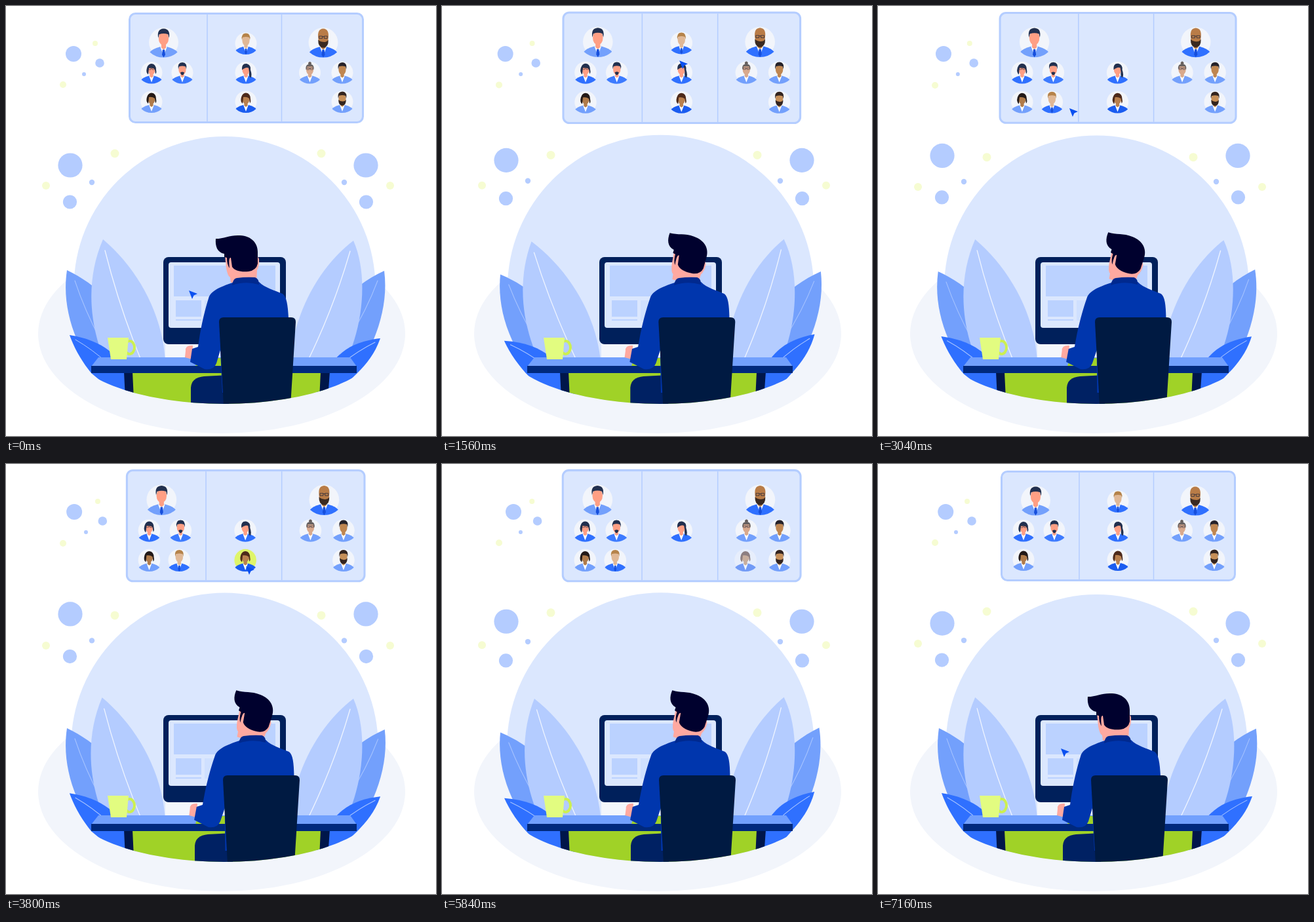
Animation of 656x656 px, one loop 7.2 s. Source, as an HTML page:

```html
<!DOCTYPE html>
<html lang="en">
<head>
<meta charset="utf-8">
<title>Team call</title>
<style>
html, body { margin: 0; width: 100%; height: 100%; overflow: hidden; background: #fff; }
svg { display: block; width: 100vw; height: 100vh; }
.vein { fill: none; stroke: #f0f5ff; stroke-width: 1.3; stroke-linecap: round; }
.thin { stroke: #a9c5ff; stroke-width: 1; }
</style>
</head>
<body>
<svg viewBox="0 0 656 656">
  <clipPath id="bowl"><path d="M0 0H656V513H573A240 94 0 0 1 93 513H0z"/></clipPath>
  <ellipse cx="329" cy="500" rx="280" ry="152" fill="#f2f5fb"/>
  <g clip-path="url(#bowl)">
    <circle id="dome" cx="333.5" cy="429" r="230" fill="#dbe7fe"/>
  </g>
  <g id="bubbles"></g>
  <g id="panel">
    <rect x="188.5" y="11.5" width="356" height="166" rx="9" fill="#dbe7fe" stroke="#b4cdff" stroke-width="3"/>
    <path d="M307 13V176M420.5 13V176" stroke="#b4cdff" stroke-width="1.5"/>
  </g>
  <g clip-path="url(#bowl)">
    <g id="leaves">
      <g><path fill="#73a0fc" d="M93 403C86 450 98 500 130 550H220C190 480 150 430 93 403"/>
        <path class="vein thin" d="M105 419Q122 470 150 520"/></g>
      <g><path fill="#73a0fc" d="M577 404C583 450 570 500 540 550H450C480 480 520 430 577 404"/>
        <path class="vein thin" d="M567 419Q548 470 515 520"/></g>
      <g><path fill="#b4ccff" d="M148 356C120 420 128 490 152 545H243C240 470 200 400 148 356"/>
        <path class="vein" d="M151 373Q173 460 206 540"/></g>
      <g><path fill="#b4ccff" d="M530 358C553 410 545 490 517 545H432C440 470 475 400 530 358"/>
        <path class="vein" d="M525 374Q500 460 461 540"/></g>
      <g><path fill="#2f70ff" d="M97 502C104 522 116 543 130 560L178 600H200C185 545 160 512 97 502"/>
        <path class="vein thin" d="M106 509Q132 524 155 545"/></g>
      <g><path fill="#2f70ff" d="M571 507C563 530 550 546 536 560L495 600H470C490 545 510 514 571 507"/>
        <path class="vein thin" d="M563 513Q537 526 513 545"/></g>
    </g>
    <path fill="#f3f6fc" d="M243 514H420V537H243z"/>
    <rect x="240" y="383" width="187" height="133" rx="8" fill="#00205b"/>
    <rect x="248" y="391" width="170" height="100" rx="4" fill="#dbe7fe"/>
    <path fill="#bbd2ff" d="M256 396H411V443H256zM259 449H298V474H259zM259 478H298V480H259z"/>
    <path fill="#cfe0ff" d="M303 449H411V480H303z"/>
    <path fill="#a0d227" d="M190 558H485V610H190z"/>
    <path fill="#00164a" d="M180 558H193L195 600H182zM480 558H494L491 600H478z"/>
    <path fill="#72a0fd" d="M141 536H525L535 550H130z"/>
    <path fill="#00297d" d="M130 549H535V560H130z"/>
    <path fill="#a0d227" d="M293 537H336V549H289z"/>
    <ellipse cx="188.5" cy="521" rx="7.5" ry="10" fill="none" stroke="#ccef52" stroke-width="4"/>
    <path fill="#e2fc80" d="M155 506H187L184 539H160z"/>
    <path id="cursor" fill="#0b50f0" d="M0 0L13 5L7.5 7.5L5 13z"/>
    <path id="legs" fill="#002163" d="M282 610V582Q283 567 302 565L340 563V610z"/>
    <g id="head">
      <path fill="#ffa9a0" d="M334 380L336 400Q338 412 342 414L343 422H382L383 403Q387 396 386 386L380 375z"/>
      <path fill="#00012e" d="M320 355C333 355 342 349 357 350C375 351 384 362 384 375V393Q382 403 370 405C358 406 349 404 345 398L343 384Q339 383 341 400Q337 394 337 384L333 383V378C322 376 319 366 320 355"/>
    </g>
    <g id="torso">
      <path fill="#ffa9a0" d="M285 518Q273 517 274 526L273 536L284 539z"/>
      <path fill="#0036ad" d="M346 422C325 429 312 435 309 446C303 465 297 490 293 520L284 523L281 543L303 554Q317 556 321 545L327 525L330 590H428L431 476C430 456 428 443 422 439C410 434 395 430 386 421z"/>
      <path fill="#00298f" d="M345 426Q346 416 352 415Q366 413 380 414Q386 416 386 425Q365 419 345 426"/>
    </g>
    <path id="chair" fill="#001a42" d="M332 475H435Q442 475 442 482L434 610H332L325 482Q325 475 332 475"/>
  </g>
</svg>
<script>
const LOOP = 7200;
const $ = id => document.getElementById(id);
const put = (el, v) => el.setAttribute('transform', v);

function add(parent, tag, attrs) {
  const el = document.createElementNS('http://www.w3.org/2000/svg', tag);
  for (const k in attrs) el.setAttribute(k, attrs[k]);
  return parent.appendChild(el);
}

// eased 0..1 between two times
function ramp(t, a, b) {
  const u = Math.min(1, Math.max(0, (t - a) / (b - a)));
  return (1 - Math.cos(Math.PI * u)) / 2;
}

// smooth wave, zero at t = 0; a lag shifts its crest
const hump = (t, period) => Math.sin(Math.PI * t / period) ** 2;
const wave = (t, period, lag) => hump(t - lag, period) - hump(-lag, period);

// pivot x, y, swing in degrees, lag
const sway = [
  [230, 490, -3, 100], [500, 470, 3.8, -900],
  [200, 560, -3.5, -300], [470, 560, -2.6, 100],
  [190, 530, -5.5, 0], [480, 540, -4.8, 200]
];
const leaves = [...$('leaves').children];

const BLUE = '#b4ccff', LIME = '#f6fcd2';
const bubbles = [];
function bubble(x, y, r, fill, dx, dy, lag) {
  bubbles.push({ el: add($('bubbles'), 'circle', { r, fill }), x, y, dx, dy, lag });
}
bubble(103, 73, 12, BLUE, -13, 0, -1800);
bubble(143, 87, 6.8, BLUE, 5, 0, 700);
bubble(119, 104, 3, BLUE, 3, 0, 0);
bubble(136, 57, 4, LIME, 4, 0, 0);
bubble(87, 120, 5, LIME, 0, 1, 0);
// the same cluster on either side of the dome
for (const side of [x => x, x => 647 - x]) {
  bubble(side(98), 243, 18.6, BLUE, 0, -15, -300);
  bubble(side(97.5), 299, 10.6, BLUE, 0, -8.5, -900);
  bubble(side(131), 269, 4.2, BLUE, 0, -4.5, -1800);
  bubble(side(166), 225, 6.5, LIME, 0, 6, 0);
  bubble(side(61), 274, 6, LIME, 0, 4, 900);
}

const HAIR = {
  short: 'M-6-5Q-8-15 0-15.5Q8-15 6-5L5-9Q0-11-5-9z',
  bob: 'M-5 3Q-9 0-7-7Q-5-13.5 0-13.5Q7-13 7-4Q8 1 6 2L5-5Q1-8-4-7z',
  pony: 'M-6-4Q-7-14 1-13.5Q8-12 7-4Q10 5 7 8Q4 6 5-1L4-7Q0-9-6-4',
  bun: 'M-6-4Q-7-12-2-12.5A2.5 2.5 0 1 1 2-12.5Q7-12 6-4L4-9H-4z',
  bald: 'M-5.6-5Q-7-15 0-15.5Q7-15 5.6-5z'
};

function avatar(x, y, size, skin, hair, suit, style, extra = '') {
  const g = add($('panel'), 'g', { transform: `translate(${x} ${y}) scale(${size})` });
  const shape = (d, fill) => add(g, 'path', { d, fill });
  const disc = add(g, 'circle', { r: 16.5, fill: '#f2f5fb' });
  shape('M-15.5 11Q-13 7.5-4 5H4Q13 7.5 15.5 11Q9 17 0 17T-15.5 11', suit);
  shape('M-3.8 5L0 15L3.8 5z', '#fff');
  if (extra.includes('t')) shape('M-1.2 8H1.2L1.8 14L0 17L-1.8 14z', '#164fdc');
  shape('M-2.6 0H2.6V6L0 8L-2.6 6z', skin);
  add(g, 'ellipse', { cy: -4.5, rx: 5.6, ry: 8, fill: skin });
  shape(HAIR[style], style === 'bald' ? skin : hair);
  if (extra.includes('b')) shape('M-5.7-3Q-6 5.5 0 6Q6 5.5 5.7-3Q4 0 0-.5T-5.7-3', hair);
  if (extra.includes('c')) shape('M-3 0Q0-2 3 0Q2 4 0 4T-3 0', hair);
  if (extra.includes('g'))
    add(g, 'path', { d: 'M-4.6-7H-1V-4.5H-4.6zM1-7H4.6V-4.5H1zM-1-6.5H1', fill: 'none', stroke: '#2c2c3c', 'stroke-width': .6 });
  return { g, disc };
}

const PALE = '#73a0fc', MID = '#2f70ff', PINK = '#ff9f84', NAVY = '#22304f';
const LEFT = 222, INNER = 269, CENTRE = 366, RIGHT = 513, ROW = 101.5, LAST = 146;
avatar(240.5, 55.5, 1.36, PINK, NAVY, PALE, 'short', 't');
avatar(LEFT, ROW, 1, PINK, NAVY, MID, 'bob', 'g');
avatar(INNER, ROW, 1, PINK, NAVY, '#3d7bff', 'short', 'c');
avatar(LEFT, LAST, 1, '#b07b4a', '#231a18', PALE, 'bob');
avatar(CENTRE, ROW, 1, PINK, NAVY, MID, 'pony');
avatar(484, 55.5, 1.36, '#b97c47', '#3a2a22', MID, 'bald', 'tbg');
avatar(463.5, ROW, 1, '#d9a98c', '#66605f', PALE, 'bun', 'g');
avatar(RIGHT, ROW, 1, '#bf8650', '#25222a', PALE, 'short');
avatar(RIGHT, LAST, 1, '#c68f58', '#33241f', PALE, 'short', 'b');

// guests dragged to another column, then faded back home
const guests = [
  { ...avatar(0, 0, 1, '#e0b896', '#b5834a', MID, 'short', 't'),
    from: [CENTRE, 57], to: [267, LAST], start: 1900, end: 2660, out: 6000 },
  { ...avatar(0, 0, 1, '#b9804e', '#4d2a1b', '#1a5cf0', 'bob'),
    from: [CENTRE, LAST], to: [462, LAST], start: 3840, end: 4500, out: 5700 }
];

// cursor: start, end, x, y
const moves = [
  [800, 1680, 366, 67], [1900, 2660, 267, 156], [2800, 3520, 366, 156], [3840, 4500, 462, 156],
  [4620, 4860, 424, 157], [4860, 5500, 380, 385], [6150, 6950, 279, 434]
];

function draw(t) {
  const scale = 1 + .02 * hump(t, 2400);
  const grow = (x, y) => `translate(${x} ${y}) scale(${scale}) translate(${-x} ${-y})`;
  put($('panel'), grow(411, 110));
  put($('dome'), grow(333, 337));

  sway.forEach(([x, y, angle, lag], i) =>
    put(leaves[i], `rotate(${angle * wave(t, LOOP / 2, lag)} ${x} ${y})`));
  for (const { el, x, y, dx, dy, lag } of bubbles) {
    const w = wave(t, LOOP, lag);
    put(el, `translate(${x + dx * w} ${y + dy * w})`);
  }

  for (const { g, disc, from, to, start, end, out } of guests) {
    const home = t > out + 350, p = home ? 0 : ramp(t, start, end);
    const [x, y] = from.map((v, i) => v + (to[i] - v) * p);
    put(g, `translate(${x} ${y})`);
    g.setAttribute('opacity', home ? ramp(t, out + 500, out + 800) : 1 - ramp(t, out, out + 300));
    const held = t > start - 200 && t < end + 60;
    disc.setAttribute('fill', held ? '#dff56a' : '#f2f5fb');
  }

  let x = 279, y = 434;
  for (const [a, b, toX, toY] of moves) {
    const p = ramp(t, a, b);
    x += (toX - x) * p;
    y += (toY - y) * p;
  }
  put($('cursor'), `translate(${x} ${y})`);

  const lean = ramp(t, 1000, 1720) - ramp(t, 6200, 6900);
  const slide = `translate(${6 * lean} 0)`;
  put($('legs'), slide);
  put($('chair'), slide);
  put($('torso'), `translate(${5.5 * lean} 560) skewX(${-2 * lean}) translate(0 -560)`);
  put($('head'), `translate(${22 * lean} ${-lean}) rotate(${18 * lean} 352 380)`);
}

function frame() {
  draw(performance.now() % LOOP);
  requestAnimationFrame(frame);
}
frame();
</script>
</body>
</html>
```
